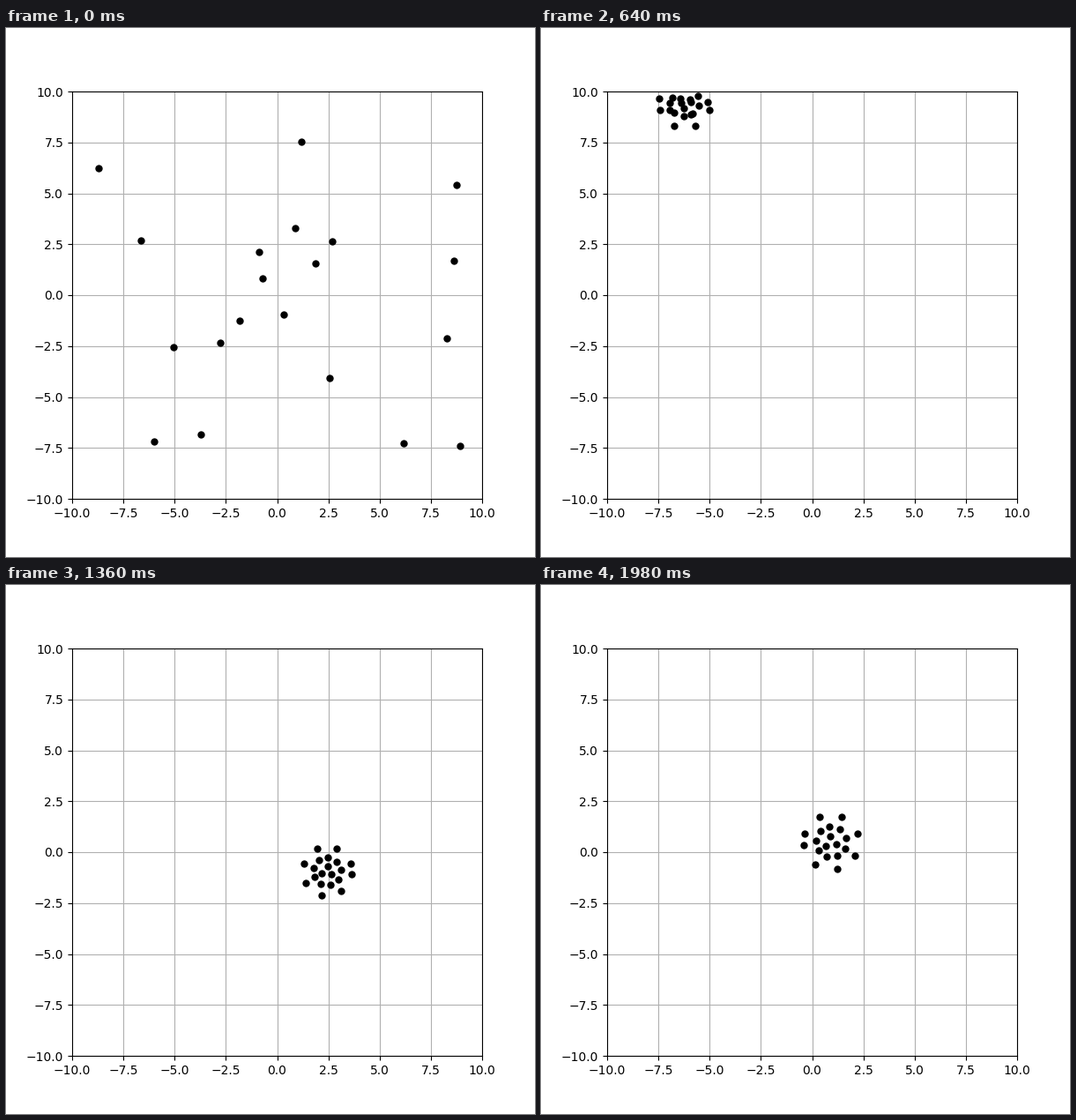
A matplotlib script for the animation above (2000 ms loop, 600 by 600 pixels).

```python
import itertools

import matplotlib.pyplot as plt
import numpy as np
from matplotlib.animation import FuncAnimation

FRAMES = 100
GATHER = 20  # steps until the scattered birds have formed a flock
WALL = 9.8   # birds bounce just inside the axes

start = np.array([
    (-8.71, 6.23), (-6.65, 2.68), (1.18, 7.53), (0.88, 3.29), (2.69, 2.64),
    (1.87, 1.56), (-0.88, 2.12), (-0.71, 0.82), (0.32, -0.95), (-1.83, -1.26),
    (-2.77, -2.34), (-5.05, -2.55), (-6.0, -7.19), (-3.72, -6.84),
    (2.56, -4.07), (6.17, -7.27), (8.92, -7.4), (8.28, -2.12), (8.62, 1.69),
    (8.75, 5.41)])

# Flock route: time, x, y, spread. It runs on through the walls
# into mirrored rooms; fold() turns the crossings into bounces.
route = np.array([
    (0, 0.70, -0.40, 1.05),
    (20, -2.19, 3.81, 1.05),
    (27, -4.19, 7.27, 1.05),
    (44, -11.87, 14.30, 1.10),
    (54, -15.45, 18.43, 1.08),
    (59, -17.54, 19.76, 1.07),
    (68, -22.03, 20.54, 1.00),
    (85, -31.02, 20.27, 1.25),
    (99, -38.28, 19.10, 1.12)])
times, knots = route[:, 0], route[:, 1:]
slopes = np.gradient(knots, times, axis=0)
slopes[0] = 0


def ring(count, radius, first, step):
    a = np.radians(first + step * np.arange(count))
    return radius * np.column_stack([np.cos(a), np.sin(a)])


def assign(birds, slots):
    """Swap slots until every bird has a short way to its own."""
    slots = slots.copy()
    swapped = True
    while swapped:
        swapped = False
        for i, j in itertools.combinations(range(len(slots)), 2):
            if np.dot(birds[i] - birds[j], slots[i] - slots[j]) < -1e-9:
                slots[[i, j]] = slots[[j, i]]
                swapped = True
    return slots


def smooth(u):
    return u * u * (3 - 2 * u)


def fold(pos):
    return WALL - np.abs((pos + WALL) % (4 * WALL) - 2 * WALL)


def flock(t):
    """Centre and spread on a cubic curve through the route."""
    k = min(np.searchsorted(times, t, side="right"), len(times) - 1) - 1
    h = times[k + 1] - times[k]
    u = (t - times[k]) / h
    bend = h * u * (1 - u) * ((1 - u) * slopes[k] - u * slopes[k + 1])
    x, y, spread = knots[k] + smooth(u) * (knots[k + 1] - knots[k]) + bend
    return np.array([x, y]), spread


offsets = start - start.mean(axis=0)
slots = assign(offsets, np.vstack([ring(3, 0.27, 264, 120),
                                   ring(9, 0.67, 185, 40),
                                   ring(8, 1.2, 198, 47.8)]))

fig, ax = plt.subplots(figsize=(6, 6), dpi=100)
ax.set_xlim(-10, 10)
ax.set_ylim(-10, 10)
ax.grid(True)
dots, = ax.plot([], [], "ko", markersize=5)


def update(i):
    center, spread = flock(i)
    s = smooth(min(i / GATHER, 1))
    shape = offsets * (1 - s) + slots * spread * s
    dots.set_data(*fold(center + shape).T)
    return dots,


anim = FuncAnimation(fig, update, frames=FRAMES, interval=20,
                     repeat=True, repeat_delay=0)
plt.show()
```
